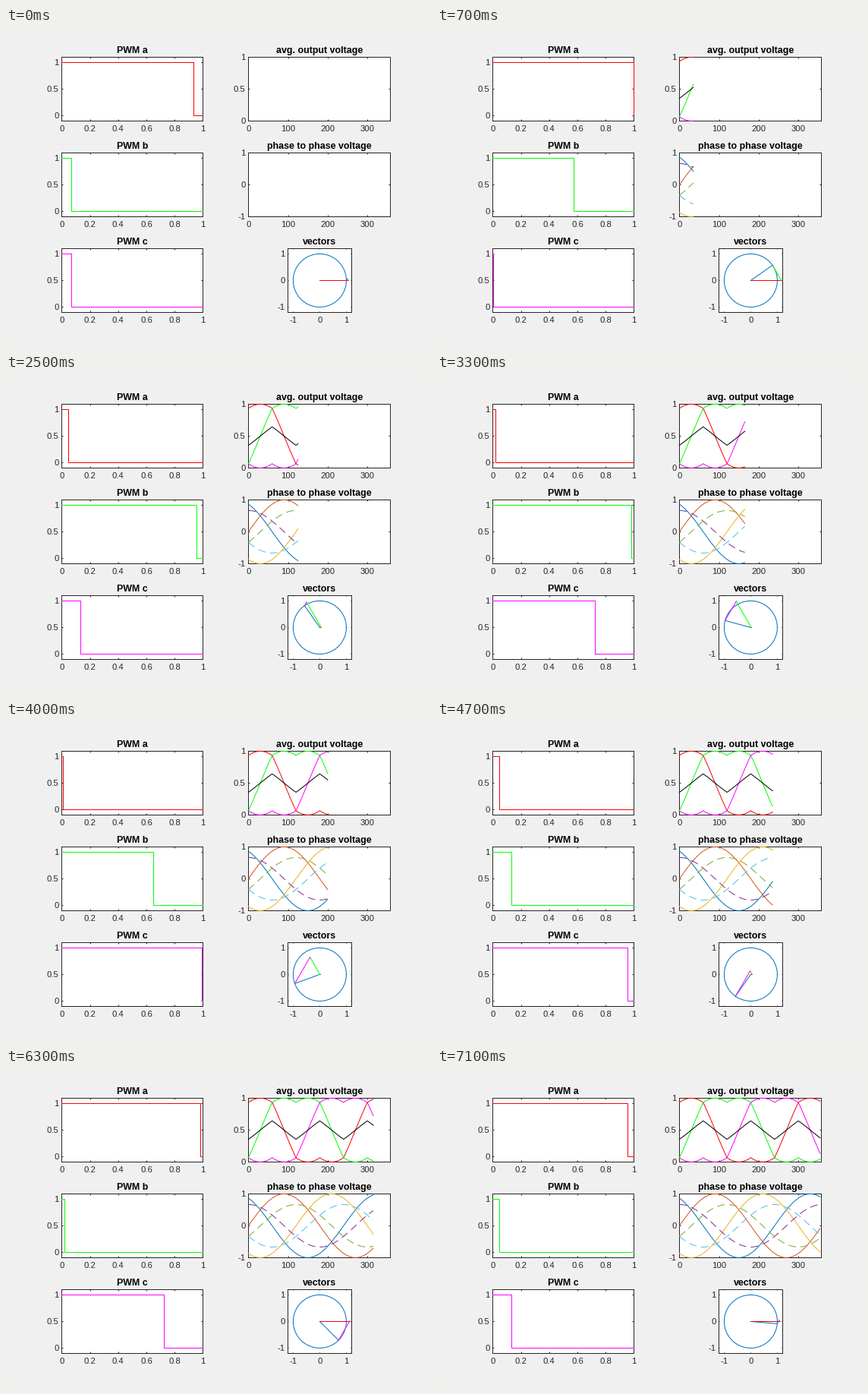
These frames come from a looping animation (560 px wide and 420 px high, 7.2 s). A matplotlib script:

```python
import numpy as np
import matplotlib.pyplot as plt
from matplotlib.animation import FuncAnimation

W, H, DPI = 560, 420, 80
PX = 72 / DPI  # one pixel in points
FRAMES, STEP = 72, 5
INK = "#262626"

plt.rcParams["font.family"] = "Liberation Sans"
plt.rcParams["axes.unicode_minus"] = False

PHASES = np.radians([0, 120, 240])
PHASE_COLORS = ["#ff0000", "#00ff00", "#ff00ff"]
WAVE_COLORS = ["#0072bd", "#d95319", "#edb120", "#7e2f8e", "#77ac30", "#4dbeee"]
BLUE = WAVE_COLORS[0]


def duties(theta):
    """Centred space vector duty cycles, one row per phase."""
    v = np.cos(theta - PHASES[:, None])
    offset = (v.max(axis=0) + v.min(axis=0)) / 2
    return 0.5 + (v - offset) / np.sqrt(3)


angles = np.arange(FRAMES) * STEP
theta = np.radians(angles)
duty = duties(theta)
averages = np.vstack([duty, duty.mean(axis=0)])
line_voltages = duty - np.roll(duty, -1, axis=0)
phase_voltages = 2 / 3 * np.cos(theta - PHASES[:, None])
waves = np.vstack([line_voltages, phase_voltages])

fig = plt.figure(figsize=(W / DPI, H / DPI), dpi=DPI, facecolor="#f0f0f0")


def panel(title, left, top, width, xlim, ylim, xticks, yticks, tick=2):
    height = 84
    ax = fig.add_axes([left / W, 1 - (top + height) / H, width / W, height / H])
    ax.set(xlim=xlim, ylim=ylim)
    ax.set_xticks(xticks, [f"{t:g}" for t in xticks])
    ax.set_yticks(yticks, [f"{t:g}" for t in yticks])
    ax.tick_params(direction="in", top=True, right=True, length=tick * PX,
                   width=PX, color=INK, labelcolor=INK, labelsize=11.2 * PX)
    ax.tick_params(axis="x", pad=6 * PX)
    ax.tick_params(axis="y", pad=4 * PX)
    for spine in ax.spines.values():
        spine.set(color=INK, linewidth=PX)
    ax.set_title(title, fontsize=12.4 * PX, fontweight="bold", pad=5 * PX)
    return ax


def line(ax, color, **style):
    """Empty line that is drawn over the panel's frame."""
    return ax.plot([], [], color=color, linewidth=PX, zorder=3,
                   clip_on=False, **style)[0]


tops = [38.4, 164.4, 290.4]
steps = []
for name, top, color in zip("abc", tops, PHASE_COLORS):
    ax = panel(f"PWM {name}", 73.4, top, 186, (0, 1), (-0.1, 1.1),
               [0, 0.2, 0.4, 0.6, 0.8, 1], [0, 0.5, 1])
    steps.append(line(ax, color, snap=True))

degrees = [0, 100, 200, 300]
avg_ax = panel("avg. output voltage", 319.4, tops[0], 187, (0, 358), (0, 1),
               degrees, [0, 0.5, 1])
avg_lines = [line(avg_ax, c) for c in PHASE_COLORS + ["black"]]

wave_ax = panel("phase to phase voltage", 319.4, tops[1], 187, (0, 358), (-1, 1),
                degrees, [-1, 0, 1])
wave_lines = [line(wave_ax, c) for c in WAVE_COLORS[:3]]
wave_lines += [line(wave_ax, c, dashes=(10, 6), dash_capstyle="butt")
               for c in WAVE_COLORS[3:]]

vec_ax = panel("vectors", 371.4, tops[2], 84, (-1.2, 1.2), (-1.2, 1.2),
               [-1, 0, 1], [-1, 0, 1], tick=1)
turn = np.linspace(0, 2 * np.pi, 181)
line(vec_ax, BLUE).set_data(np.cos(turn), np.sin(turn))
pointer = line(vec_ax, BLUE)
arms = [line(vec_ax, c) for c in PHASE_COLORS]


def update(i):
    for d, step in zip(duty[:, i], steps):
        step.set_data([0, d, d, 1], [1, 1, 0, 0])

    for lines, values in ((avg_lines, averages), (wave_lines, waves)):
        for curve, y in zip(lines, values):
            # a single first point draws nothing
            curve.set_data(angles[:i + 1], y[:i + 1])
            curve.set_visible(i > 0)

    pointer.set_data([0, np.cos(theta[i])], [0, np.sin(theta[i])])
    parts = 2 / np.sqrt(3) * duty[:, i] * np.exp(1j * PHASES)
    joints = np.concatenate([[0], np.cumsum(parts)])
    for arm, start, end in zip(arms, joints, joints[1:]):
        arm.set_data([start.real, end.real], [start.imag, end.imag])
    return []


anim = FuncAnimation(fig, update, frames=FRAMES, interval=100, repeat=True)
plt.show()
```
